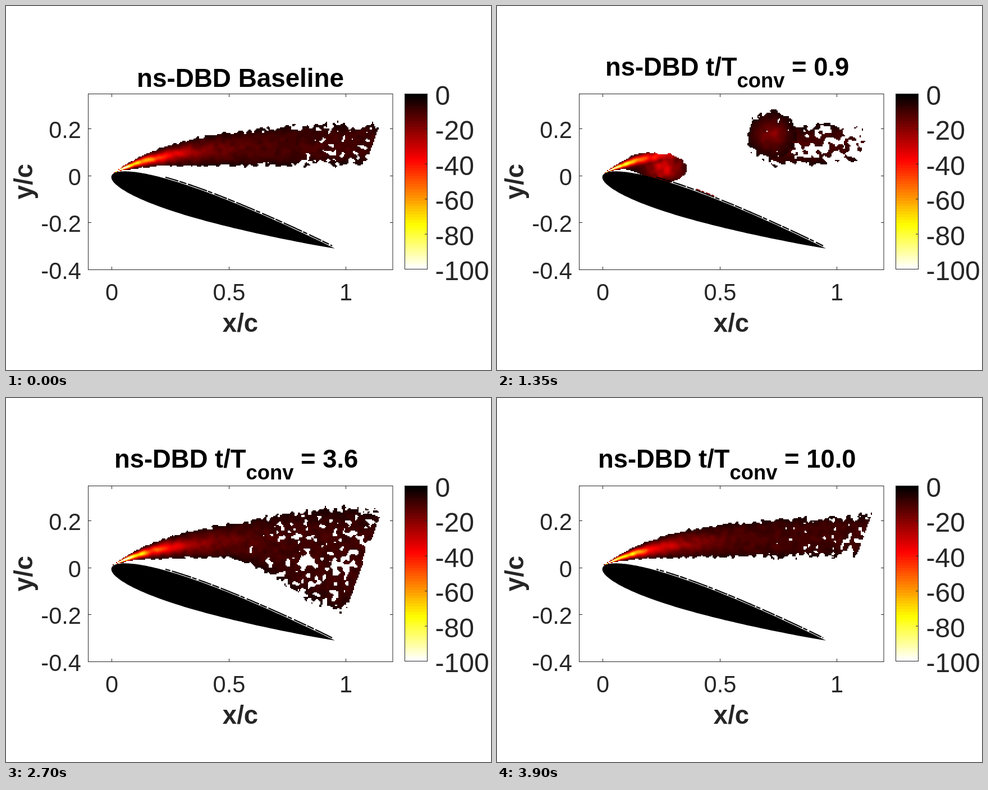
These frames come from a looping animation (864x648 px, 4.05 s). An HTML page with a canvas:

```html
<!DOCTYPE html>
<html lang="en">
<head>
<meta charset="utf-8">
<title>ns-DBD flow field</title>
<style>
  html, body { margin: 0; width: 100%; height: 100%; overflow: hidden; background: #fff; }
  canvas { display: block; }
</style>
</head>
<body>
<canvas id="stage" width="864" height="648"></canvas>
<script>
const ctx = document.getElementById('stage').getContext('2d');
const STEP = 150, COUNT = 27, CELL = 2, INK = '#262626';
const PITCH = Math.PI / 10, COS = Math.cos(PITCH), SIN = Math.sin(PITCH);

const clamp = (v, lo, hi) => Math.max(lo, Math.min(hi, v));
const mix = (a, b, f) => a + (b - a) * f;
const smooth = f => f * f * (3 - 2 * f);
const band = (top, bottom) => ({ mid: (top + bottom) / 2, half: (bottom - top) / 2 });

// Convective time: the sampling gets coarser as the flow settles.
function convectiveTime(index) {
  let t = 0;
  for (let i = 0; i < index; i++) t += t < .95 ? .1 : t < 1.55 ? .2 : t < 3.95 ? .4 : t < 4.95 ? .5 : 1;
  return t;
}

function hash(x, y, seed) {
  const h = Math.sin(x * 127.1 + y * 311.7 + seed * 74.7) * 43758.5453;
  return h - Math.floor(h);
}

// Value noise on a lattice aligned with the airfoil chord.
function noise(x, y, size, seed) {
  const a = (x * COS + y * SIN) / size, b = (y * COS - x * SIN) / size;
  const i = Math.floor(a), j = Math.floor(b), f = smooth(a - i), g = smooth(b - j);
  return mix(mix(hash(i, j, seed), hash(i + 1, j, seed), f),
    mix(hash(i, j + 1, seed), hash(i + 1, j + 1, seed), f), g);
}

function hot(v) {
  v = Math.round(clamp(v, 0, 1) * 63) / 63;
  const part = (from, span) => Math.round(255 * clamp((v - from) / span, 0, 1));
  return `rgb(${part(0, .375)},${part(.375, .375)},${part(.75, .25)})`;
}

// Steady separated shear layer.
function wakeAt(x) {
  const d = x - 190;
  return band(210 + 86 * Math.exp(-d / 118), 283 + 14 * Math.exp(-d / 40) - 8 * (d / 478) ** 3);
}

// Growing jet: the steady layer swells into a rounded head that travels downstream.
function jetAt(x, t) {
  const head = { x: 193 + 116 * t, y: 288, rx: 43 * t ** .75, ry: 29 * t ** .9 };
  const ahead = (x - head.x) / head.rx;
  if (ahead >= 1) return null;
  if (ahead > 0) return { mid: head.y, half: head.ry * Math.sqrt(1 - ahead * ahead), swell: 1, head };
  const base = wakeAt(x), swell = smooth(clamp(1 + ahead / 2, 0, 1));
  return { mid: mix(base.mid, head.y, swell), half: mix(base.half, head.ry, swell), swell, head };
}

function drawField(t, seed) {
  const vortex = { x: 195 + 325 * t, y: 226 + 105 * Math.exp(-4 * t), r: 45 * (1 - Math.exp(-3 * t)) };
  const shed = t < 1.6;
  const decay = .0016 + .0024 * Math.exp(-(((t - 5) / 1.2) ** 2));

  for (let x = 190; x < 668; x += CELL) {
    const base = wakeAt(x), jet = jetAt(x, t);
    const rough = 1 + Math.max(0, x - 240) * .025;
    const fade = Math.max(0, x - 460) * decay;
    const core = 1.05 * Math.exp(-(x - 200) / 65);

    for (let y = 180; y < 386; y += CELL) {
      if (x > 665 - (y - 210) * .36) continue;
      const ragged = (noise(x, y, 6, seed) - .5) * 2 * rough;
      const solid = noise(x, y, 7, seed + 20);
      const c = (y - base.mid) / base.half, heat = core * Math.exp(-3 * c * c);
      const ambient = u => .09 * (1 - .5 * Math.min(1, u ** 4));
      let value = 0;

      if (jet) {
        const u = (y - jet.mid) / jet.half;
        const seam = .8 * jet.swell * (1 - jet.swell) * clamp(t - 1.4, 0, 1);
        const holes = Math.min(.65, (fade + seam) * (1 + .4 * u));
        if (jet.half * (1 - Math.abs(u)) + ragged > 0 && solid > holes) {
          const d = Math.hypot((x - jet.head.x) / jet.head.rx, (y - jet.head.y) / jet.head.ry);
          value = Math.max(ambient(u) + heat, Math.min(1, .28 / t) * Math.exp(-1.2 * d * d));
        }
      }
      if (shed) {
        const d = Math.hypot(x - vortex.x, y - vortex.y) / vortex.r;
        const inWake = x > vortex.x && base.half * (1 - Math.abs(c)) + ragged > 0;
        const inVortex = vortex.r * (1 - d) + ragged > 0;
        const holes = fade + (inVortex ? 0 : Math.max(0, t - .3) * .45);
        if ((inWake || inVortex) && solid > holes) {
          value = Math.max(value, ambient(inVortex ? d : c) + (inWake ? Math.min(.08, heat) : 0),
            (.09 + .6 * Math.exp(-2 * t)) * Math.exp(-1.6 * d * d));
        }
      }
      if (value) {
        ctx.fillStyle = hot(value * mix(.8, 1.2, noise(x, y, 9, seed + 50)));
        ctx.fillRect(x, y, CELL, CELL);
      }
    }
  }
}

// Symmetric airfoil; side is 1 for the upper surface, lift offsets it outwards.
function surface(c, side, lift) {
  const chord = 418.5;
  const thick = .62 * (.2969 * Math.sqrt(c) - .126 * c - .3516 * c * c + .2843 * c ** 3 - .1036 * c ** 4);
  const n = side * (thick * chord + lift);
  return [188 + c * chord * COS + n * SIN, 302.5 + c * chord * SIN - n * COS];
}

function trace(from, to, side, lift = 0) {
  for (let i = 0; i <= 80; i++) {
    ctx.lineTo(...surface(mix(Math.sqrt(from), Math.sqrt(to), i / 80) ** 2, side, lift));
  }
}

function drawAirfoil(t, seed) {
  const strip = (from, to, lift, color, dash) => {
    ctx.beginPath();
    trace(from, to, 1, lift);
    ctx.strokeStyle = color;
    ctx.lineWidth = 2.2;
    ctx.setLineDash(dash);
    ctx.lineDashOffset = seed * 17;
    ctx.stroke();
    ctx.setLineDash([]);
  };
  ctx.beginPath();
  trace(0, 1, 1);
  trace(1, 0, -1);
  ctx.fillStyle = '#000';
  ctx.fill();
  strip(.22, .985, 2.2, '#000', t > 1 && t < 2 ? [7, 15, 3, 9] : [24, 2, 13, 3, 36, 2, 8, 4]);
  if (t < 1.6) {
    const c = (27 + 165 * t) / 397;
    strip(c - .045, c + .045, 4, '#800000', [9, 2, 5, 3]);
  }
}

function text(str, x, y, size, align = 'left', bold = false, color = INK) {
  ctx.font = `${bold ? 'bold ' : ''}${size}px "Liberation Sans", Arial, sans-serif`;
  ctx.textAlign = align;
  ctx.fillStyle = color;
  ctx.fillText(str, x, y);
  return x + ctx.measureText(str).width;
}

function line(x1, y1, x2, y2) {
  ctx.beginPath();
  ctx.moveTo(x1, y1);
  ctx.lineTo(x2, y2);
  ctx.stroke();
}

function drawAxes() {
  ctx.strokeStyle = INK;
  ctx.lineWidth = 1;
  ctx.strokeRect(146.5, 156.5, 542.5, 313);
  ['0', '0.5', '1'].forEach((label, i) => {
    const x = Math.round(188 + i * 208.7) + .5;
    line(x, 469, x, 464);
    line(x, 157, x, 162);
    text(label, x, 524, 41.6, 'center');
  });
  ['0.2', '0', '-0.2', '-0.4'].forEach((label, i) => {
    const y = Math.round(219 + i * 83.5) - .5;
    line(147, y, 152, y);
    line(689, y, 684, y);
    text(label, 134, y + 16.5, 41.6, 'right');
  });
  text('x/c', 417.5, 580, 45.5, 'center', true);
  ctx.save();
  ctx.translate(47, 312.5);
  ctx.rotate(-Math.PI / 2);
  text('y/c', 0, 0, 45.5, 'center', true);
  ctx.restore();

  for (let i = 0; i < 64; i++) {
    ctx.fillStyle = hot(i / 63);
    ctx.fillRect(710, Math.round(156 + i * 4.89), 41, 5);
  }
  ctx.strokeRect(710.5, 156.5, 40, 312);
  for (let i = 0; i < 6; i++) {
    const y = 156.5 + i * 62.4;
    line(746, y, 751, y);
    text(i ? String(-20 * i) : '0', 764.5, y + 19.5, 48);
  }
}

function drawTitle(t, baseline) {
  const put = (str, x, y, size = 45.4, align = 'left') => text(str, x, y, size, align, true, '#000');
  if (baseline) return put('ns-DBD Baseline', 417.5, 144, 45.8, 'center');
  let x = put('ns-DBD t/T', t < 9.5 ? 193 : 180, 123.5);
  x = put('conv', x, 145, 36.4);
  put(' = ' + t.toFixed(1), x, 123.5);
}

function draw(index) {
  const t = convectiveTime(index || COUNT - 1);
  ctx.fillStyle = '#fff';
  ctx.fillRect(0, 0, 864, 648);
  drawField(t, index);
  drawAirfoil(t, index);
  drawAxes();
  drawTitle(t, !index);
}

let shown = -1;
function tick() {
  const index = Math.floor(performance.now() / STEP) % COUNT;
  if (index !== shown) draw(shown = index);
  requestAnimationFrame(tick);
}
tick();
</script>
</body>
</html>
```
